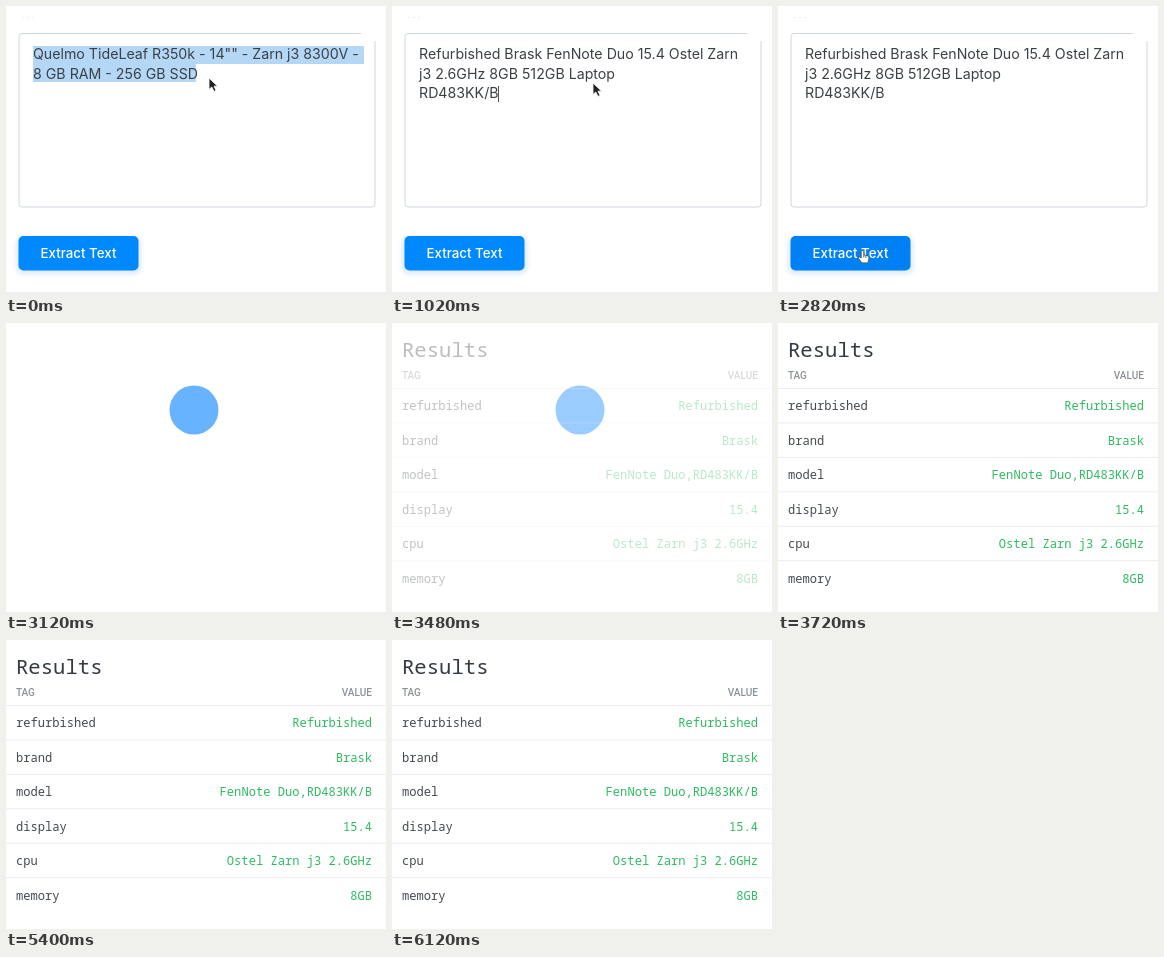
Animation, 380 px wide and 289 px high, one loop 6.18 s. Source, as an HTML page:

```html
<!DOCTYPE html>
<html lang="en">
<head>
<meta charset="utf-8">
<title>Text extraction demo</title>
<style>
  html, body { margin: 0; width: 100%; height: 100%; overflow: hidden; background: #fff; }
  svg { display: block; width: 100%; height: 100%; }
  .input { font: 14.2px Inter, sans-serif; fill: #3b4046; }
  .button { font: 500 13.3px Inter, sans-serif; fill: #fff; text-anchor: middle; }
  .mono { font: 12.1px "Noto Sans Mono", monospace; fill: #444a51; }
  .title { font-size: 20.6px; fill: #343a42; }
  .head { font: 500 10px Roboto, sans-serif; fill: #8b9096; }
  .value { text-anchor: end; }
  .mono.value { fill: #2fba61; }
</style>
</head>
<body>
<svg viewBox="0 0 380 289">
  <defs>
    <filter id="blur" x="-20%" y="-50%" width="140%" height="200%">
      <feGaussianBlur stdDeviation="2.5"/>
    </filter>
  </defs>
  <g id="form">
    <path d="M16 11.5H31" stroke="#eee" stroke-dasharray="2 3"/>
    <rect x="13" y="27.5" width="356" height="173.5" rx="3" fill="#fff" stroke="#d0d8e1"/>
    <rect x="355" y="21" width="16" height="14" fill="#fff"/>
    <g id="before">
      <path d="M27 40H358V58H190V76H27Z" fill="#b5d7f6"/>
    </g>
    <g id="after">
      <path id="caret" d="M106.5 80V96" stroke="#555"/>
    </g>
    <rect x="10" y="231" width="125" height="37" rx="7" fill="#d3e4f5" opacity=".85" filter="url(#blur)"/>
    <rect id="button" x="12.5" y="230" width="120" height="34.5" rx="5"/>
    <text class="button" x="72.5" y="251.5">Extract Text</text>
    <path d="M0 287.5H380" stroke="#ececee" stroke-width="2.5"/>
    <path id="arrow" d="M0 0V11.5L2.8 9L5 13.4L7.1 12.4L5 8.2H8.6Z" fill="#222" stroke="#fff" stroke-width=".8"/>
    <g id="hand" fill="#fff" stroke="#555" stroke-width=".9">
      <path d="M-1.3 1Q0-1 1.3 1V4.3L5.5 5.4Q6.8 6 6.4 8L5.5 12.4H-.5L-4 8Q-4.5 6-2.7 6.6L-1.3 7.6Z"/>
      <path d="M1.3 4.3V7M3.4 5V7.4"/>
    </g>
  </g>
  <circle id="loader" cx="188" cy="87" r="24.5" fill="#68b3ff"/>
  <g id="results">
    <text class="mono title" x="10" y="34">Results</text>
    <text class="head" x="10" y="55.5">TAG</text>
    <text class="head value" x="366" y="55.5">VALUE</text>
  </g>
</svg>
<script>
const LOOP = 6180, STEP = 60;
const $ = id => document.getElementById(id);

function add(parent, tag, attrs, content = "") {
  const node = document.createElementNS("http://www.w3.org/2000/svg", tag);
  for (const name in attrs) node.setAttribute(name, attrs[name]);
  node.textContent = content;
  $(parent).append(node);
}

function addLines(parent, lines) {
  lines.forEach((line, i) => add(parent, "text", { class: "input", x: 27, y: 53 + i * 19.7 }, line));
}

addLines("before", ['Quelmo TideLeaf R350k - 14"" - Zarn j3 8300V -', "8 GB RAM - 256 GB SSD"]);
addLines("after", ["Refurbished Brask FenNote Duo 15.4 Ostel Zarn", "j3 2.6GHz 8GB 512GB Laptop", "RD483KK/B"]);

[
  ["refurbished", "Refurbished"],
  ["brand", "Brask"],
  ["model", "FenNote Duo,RD483KK/B"],
  ["display", "15.4"],
  ["cpu", "Ostel Zarn j3 2.6GHz"],
  ["memory", "8GB"]
].forEach(([tag, value], i) => {
  const y = 65.5 + i * 34.45;
  add("results", "path", { d: `M0 ${y}H380`, stroke: "#e8edf1" });
  add("results", "text", { class: "mono", x: 10, y: y + 21.8 }, tag);
  add("results", "text", { class: "mono value", x: 366, y: y + 21.8 }, value);
});

const progress = (t, from, to) => Math.min(1, Math.max(0, (t - from) / (to - from)));
const ease = p => p * p * (3 - 2 * p);
const mix = (a, b, p) => a + (b - a) * p;
const show = (id, visible) => $(id).setAttribute("visibility", visible ? "inherit" : "hidden");
const fade = (id, opacity) => $(id).setAttribute("opacity", opacity);

function draw(t) {
  show("form", t < 3120);
  show("before", t < 480);
  show("after", t >= 480);
  show("caret", t >= 480 && t < 1980);

  const nudge = ease(progress(t, 0, 300));
  const travel = ease(progress(t, 1020, 1620));
  const x = mix(mix(203, 201, nudge), 84.5, travel);
  const y = mix(mix(72, 77, nudge), 244.5, travel);
  const overButton = y > 230;
  for (const id of ["arrow", "hand"]) $(id).setAttribute("transform", `translate(${x} ${y})`);
  show("arrow", !overButton);
  show("hand", overButton);

  const press = progress(t, 2400, 2640) - progress(t, 2760, 2940);
  $("button").setAttribute("fill", `rgb(0 ${136 - 12 * press} ${255 - 15 * press})`);

  const reveal = progress(t, 3420, 3600);
  show("loader", t >= 3120);
  fade("loader", 1 - reveal);
  fade("results", reveal);
}

function tick() {
  draw(Math.floor(performance.now() % LOOP / STEP) * STEP);
  requestAnimationFrame(tick);
}
tick();
</script>
</body>
</html>
```
